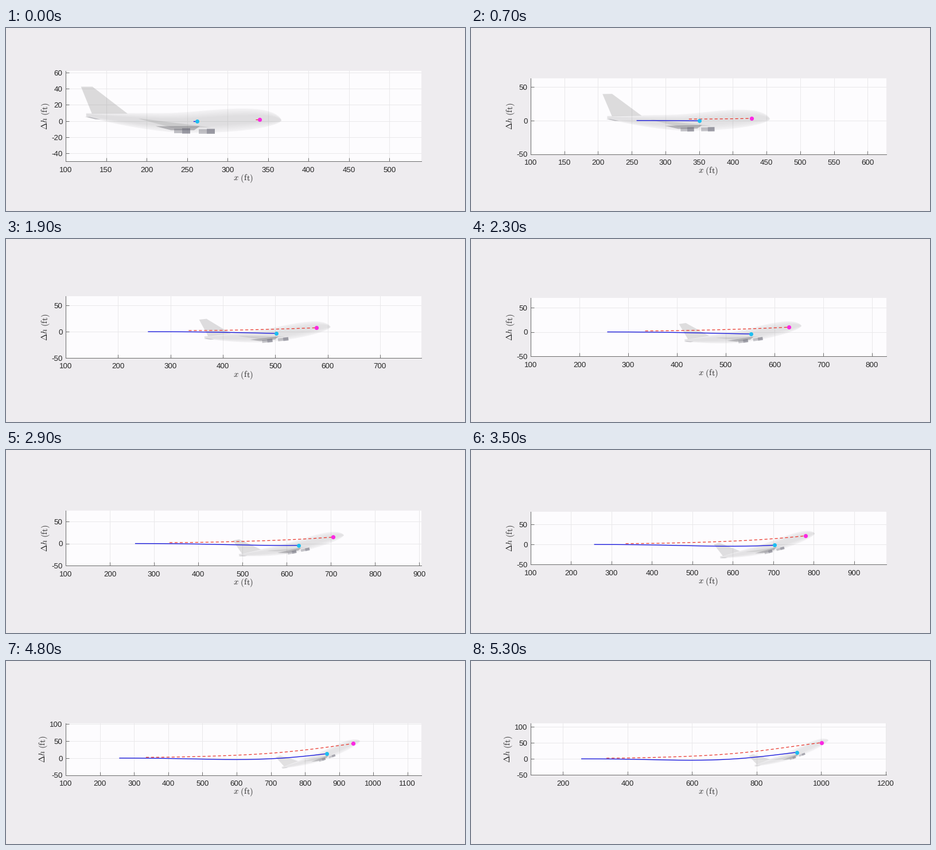
A matplotlib script for the animation above (5400 ms loop, 800 px wide and 320 px high).

```python
import numpy as np
import matplotlib.pyplot as plt
from matplotlib.animation import FuncAnimation
from matplotlib.patches import Polygon

W, H, DPI = 800, 320, 100
PX = 72 / DPI                      # points per pixel
FRAMES, INTERVAL = 54, 100
LEFT, WIDTH, MIDDLE = 104, 620, 154.1
START = -0.35                      # trail begins just before the first frame
ARM, EYE = 77, 2.2                 # cockpit position ahead of / above the CG, ft
UNIT = 1.41                        # drawing units per foot
INK, AXIS = "#262626", "#6c6c6c"

plt.rcParams.update({
    "font.family": "Liberation Sans",
    "mathtext.fontset": "cm",
    "axes.unicode_minus": False,
    "text.hinting": "no_hinting",
})


def smooth(v, start, end):
    u = np.clip((np.asarray(v, float) - start) / (end - start), 0, 1)
    return u * u * (3 - 2 * u)


# Flight path

def cg(k):
    """The CG sinks at first, then climbs once the nose is up."""
    x = 262.2 + 12.63 * k - 4.6e-5 * k ** 3
    return x, k ** 2 * (0.01757 * smooth(k, 14, 58) - 0.0097)


def pitch(k):
    return 0.362 * smooth(k, 0, 51.5)


def cockpit(k):
    x, y = cg(k)
    return x + ARM, y + EYE + ARM * pitch(k)


# Aircraft side view, relative to the CG

def body(scale):
    """Fuselage outline squeezed towards its own axis, for soft shading."""
    x = 147 - 340 * np.linspace(0, 1, 80) ** 1.5
    nose = np.clip((x - 70) / 77, 0, 1)
    chin = np.clip(x / 147, 0, 1)
    tail = np.clip((-20 - x) / 173, 0, 1)
    top = 1 + (13 + 8 * smooth(x, -60, 80)) * (1 - nose ** 3) ** 0.6
    low = 1 + (28 * tail ** 1.6 - 21.5) * (1 - chin ** 2) ** 0.6
    mid, half = (top + low) / 2, (top - low) / 2 * scale
    return np.column_stack([np.append(x, x[::-1]),
                            np.append(mid + half, (mid - half)[::-1])])


def trapezoid(base, y_base, top, y_top):
    return [(base[0], y_base), (base[1], y_base), (top[1], y_top), (top[0], y_top)]


def box(x, y, w, h):
    return trapezoid((x - w / 2, x + w / 2), y - h / 2, (x - w / 2, x + w / 2), y + h / 2)


PARTS = [(body(1), "#808080", 0.08)]
PARTS += [(body(s), "#808080", 0.03) for s in np.linspace(0.9, 0.4, 5)]
PARTS += [
    (trapezoid((-183, -121), 13, (-202, -182), 60), "#808080", 0.27),     # fin
    (trapezoid((-177, -168), 3, (-195, -187), 7.5), "#707078", 0.4),      # stabilizer
    (trapezoid((-45, 25), -11, (-102, -96), 4), "#707070", 0.18),         # wing
    (trapezoid((-45, -5), -16, (-72, 5), -9), "#606066", 0.4),            # underside
]
for front, y in ((-12, -17.5), (31, -18)):
    PARTS += [(box(front - 14, y, 28, 8), "#70707a", 0.4),
              (box(front - 7, y, 14, 9.5), "#606070", 0.4)]


# Stage

def ticks(lo, hi, step):
    return np.arange(np.ceil(lo / step), np.floor(hi / step) + 1) * step


def x_ticks(hi):
    for step in (50, 100, 200):
        marks = ticks(100, hi, step)
        if len(marks) <= 11:
            break
    return marks


def labels(marks):
    return [f"{m:g}" for m in marks]


fig = plt.figure(figsize=(W / DPI, H / DPI), dpi=DPI, facecolor="#eeecef")
ax = fig.add_axes([0.13, 0.25, 0.775, 0.5], facecolor="#fdfcfe")
ax.set_axisbelow(True)
ax.grid(color="#e9e8ea", lw=PX)
ax.tick_params(direction="in", length=6 * PX, width=PX, color=AXIS,
               labelcolor=INK, labelsize=13.4 * PX)
ax.tick_params(axis="x", pad=9 * PX)
ax.tick_params(axis="y", pad=5.5 * PX)
for side, spine in ax.spines.items():
    spine.set_visible(side in ("left", "bottom"))
    spine.set(color=AXIS, linewidth=PX)

name_style = dict(size=14.8 * PX, color=INK, ha="center", va="center")
x_name = fig.text(414 / W, 0.2, r"$x\ \mathrm{(ft)}$", **name_style)
y_name = fig.text(69 / W, 1 - MIDDLE / H, r"$\Delta h\ \mathrm{(ft)}$",
                  rotation=90, **name_style)

plane = []
for points, color, alpha in PARTS:
    patch = Polygon(points, closed=True, fc=color, ec="none", zorder=2.2)
    ax.add_patch(patch)
    plane.append((patch, np.array(points) / UNIT, alpha))

cockpit_trail, = ax.plot([], [], color="#ea3a30", lw=1.3 * PX, ls=(0, (4, 2.9)), zorder=3)
cg_trail, = ax.plot([], [], color="#1c1cdc", lw=1.4 * PX, zorder=3)
cg_dot, = ax.plot([], [], "o", color="#1cbdf0", ms=7 * PX, mew=0, zorder=4)
cockpit_dot, = ax.plot([], [], "o", color="#fa28e2", ms=7.2 * PX, mew=0, zorder=4)


def draw(k):
    (cx, cy), (px, py) = cg(k), cockpit(k)
    x_max, y_max = cx + 277.2, py + 60
    scale = WIDTH / (x_max - 100)
    height = scale * (y_max + 50)
    bottom = MIDDLE + height / 2

    ax.set_position([LEFT / W, 1 - bottom / H, WIDTH / W, height / H])
    ax.set_xlim(100, x_max)
    ax.set_ylim(-50, y_max)
    xs = x_ticks(x_max)
    ys = ticks(-50, y_max, 20 if 20 * scale >= 25 else 50)
    ax.set_xticks(xs, labels(xs))
    ax.set_yticks(ys, labels(ys))
    x_name.set_y(1 - (bottom + 29.4) / H)
    y_name.set_x((65 if ys[-1] >= 100 else 69) / W)

    a = pitch(k)
    turn = np.array([[np.cos(a), np.sin(a)], [-np.sin(a), np.cos(a)]])
    fade = 1 - 0.2 * k / FRAMES
    for patch, points, alpha in plane:
        patch.set_xy(points @ turn + (cx, cy))
        patch.set_alpha(alpha * fade)

    past = np.linspace(START, k, 200)
    cg_trail.set_data(*cg(past))
    cockpit_trail.set_data(*cockpit(past))
    cg_dot.set_data([cx], [cy])
    cockpit_dot.set_data([px], [py])
    return []


anim = FuncAnimation(fig, draw, frames=FRAMES, interval=INTERVAL,
                     repeat=True, repeat_delay=0, blit=False)
plt.show()
```
